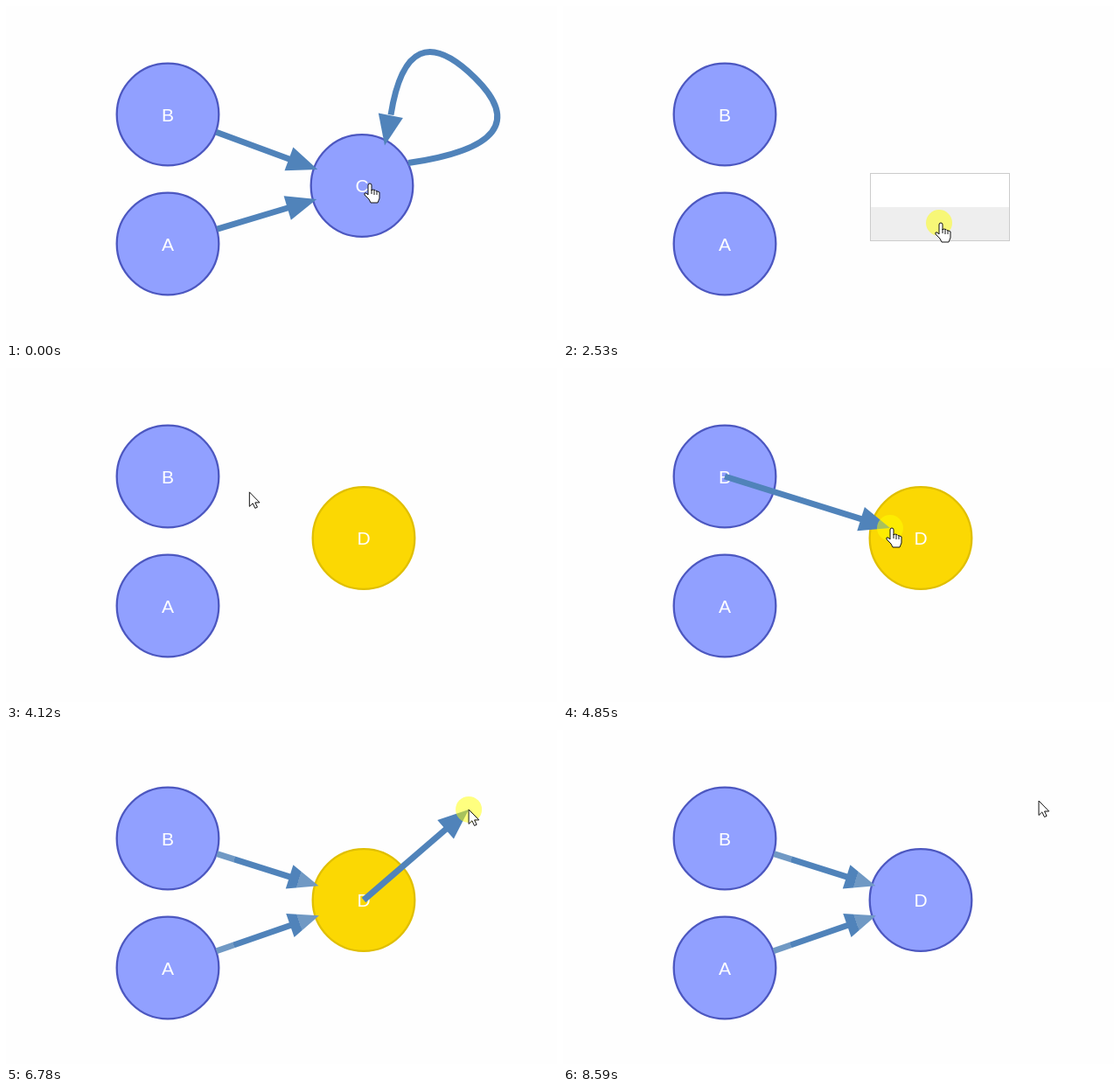
These frames come from a looping animation (630 by 382 pixels, 9 s). An HTML page with a canvas:

```html
<!DOCTYPE html>
<html lang="en">
<head>
<meta charset="utf-8">
<title>Graph editor</title>
<style>
html, body { margin: 0; width: 100%; height: 100%; overflow: hidden; background: #fefefe; }
canvas { display: block; }
</style>
</head>
<body>
<canvas id="stage" width="630" height="382"></canvas>
<script>
const ctx = document.getElementById('stage').getContext('2d');
const LOOP = 9000, R = 58.3;
const BLUE = '#5083ba', LIGHT = '#7099c4', GOLD = '#fbd803';
const RED = 'rgba(255,0,0,.47)', YELLOW = 'rgba(255,255,0,.5)';
const A = { x: 185, y: 272, name: 'A' };
const B = { x: 185, y: 124, name: 'B' };
const C = { x: 407, y: 205.5, name: 'C' };
const GRAB = { x: 27, y: 21.5 };   // from the pointer to the centre of D

// pointer: time, x, y
const path = [
  [0, 414, 203], [2010, 414, 203], [2270, 430, 248], [3020, 430, 248],
  [3150, 456, 285.5], [3290, 443, 267], [3620, 382, 173], [3990, 382, 173],
  [4120, 279, 142], [4260, 187, 125], [4320, 187, 125], [4850, 374, 183],
  [5220, 374, 183], [5480, 190, 271], [5540, 190, 271], [5820, 370, 227],
  [6080, 385, 222], [6580, 385, 222], [6780, 529, 91], [6920, 540, 82],
  [7060, 540, 82], [7440, 444, 163], [7580, 444, 163], [8000, 544, 81], [9000, 544, 81]
];
// pressed button: from, to, colour
const presses = [
  [530, 600, RED], [960, 1030, YELLOW], [1440, 1570, RED], [2530, 2590, YELLOW],
  [3150, 3620, YELLOW], [4320, 4910, YELLOW], [5540, 6390, YELLOW],
  [6580, 7510, YELLOW], [8090, 8160, YELLOW]
];
const hand = new Path2D('M0 2a2 2 0 0 1 4 0v6l1-1 3 .5 1 1 2 .5 2 1v7l-2 5h-8l-2-4-5-5q-1-3 2-2l2 2z');
const fingers = new Path2D('M4 7v5M7 8v5M10 9v4');
const arrow = new Path2D('M0 0v16.5l3.8-3.6 2.7 5.6 2.6-1.2-2.6-5.3h5.2z');

const within = (t, from, to) => t >= from && t < to;
const distance = (p, q) => Math.hypot(p.x - q.x, p.y - q.y);

function pointerAt(t) {
  const i = path.findIndex(k => k[0] > t);
  const [t0, x0, y0] = path[i - 1], [t1, x1, y1] = path[i];
  const f = (t - t0) / (t1 - t0);
  return { x: x0 + (x1 - x0) * f, y: y0 + (y1 - y0) * f };
}

function disc(x, y, r, fill) {
  ctx.beginPath();
  ctx.arc(x, y, r, 0, 7);
  ctx.fillStyle = fill;
  ctx.fill();
}

function drawNode(n, selected) {
  disc(n.x, n.y, R, selected ? GOLD : '#91a0ff');
  ctx.strokeStyle = selected ? '#e0bf00' : '#4c57c0';
  ctx.lineWidth = 2.3;
  ctx.stroke();
  ctx.fillStyle = '#fff';
  ctx.font = '21px "Liberation Sans", Arial, sans-serif';
  ctx.textAlign = 'center';
  ctx.fillText(n.name, n.x, n.y + 7.5);
}

function drawHead(x, y, angle, colour) {
  ctx.save();
  ctx.translate(x, y);
  ctx.rotate(angle);
  ctx.beginPath();
  ctx.moveTo(0, 0);
  ctx.lineTo(-35, -14.3);
  ctx.lineTo(-35, 14.3);
  ctx.restore();
  ctx.fillStyle = colour;
  ctx.fill();
}

// Straight arrow between two distances along the line from p to q
function drawArrow(p, q, start, end, colour = BLUE) {
  const angle = Math.atan2(q.y - p.y, q.x - p.x);
  const at = d => [p.x + Math.cos(angle) * d, p.y + Math.sin(angle) * d];
  if (end - 34 > start) {
    ctx.beginPath();
    ctx.moveTo(...at(start));
    ctx.lineTo(...at(end - 34));
    ctx.strokeStyle = colour;
    ctx.lineWidth = 7;
    ctx.stroke();
  }
  drawHead(...at(end), angle, colour);
}

function drawEdge(p, q, shaded) {
  const d = distance(p, q);
  let colour = BLUE;
  if (shaded) {
    colour = ctx.createLinearGradient(p.x, p.y, q.x, q.y);
    const a = 80 / d, b = 1 - 78 / d;
    [[0, LIGHT], [a, LIGHT], [a, BLUE], [b, BLUE], [b, LIGHT], [1, LIGHT]]
      .forEach(stop => colour.addColorStop(...stop));
  }
  drawArrow(p, q, 59, d - 54, colour);
}

function drawSelfLoop(n, colour) {
  ctx.save();
  ctx.translate(n.x, n.y);
  ctx.beginPath();
  ctx.moveTo(53, -26);
  ctx.quadraticCurveTo(206, -48, 129, -123.5);
  ctx.quadraticCurveTo(52, -199, 33, -81);
  ctx.strokeStyle = colour;
  ctx.lineWidth = 7;
  ctx.stroke();
  drawHead(26, -46, Math.atan2(35, -7), colour);
  ctx.restore();
}

function drawMenu(rows, active) {
  ctx.fillStyle = '#fff';
  ctx.fillRect(351, 191, 160, rows * 39);
  ctx.fillStyle = '#eee';
  ctx.fillRect(351, 191 + active * 39, 160, 39);
  ctx.strokeStyle = '#ccc';
  ctx.lineWidth = 1;
  ctx.strokeRect(351.5, 191.5, 159, rows * 39 - 1);
}

function drawPointer(p, isHand) {
  ctx.save();
  ctx.translate(p.x, p.y);
  ctx.fillStyle = '#fff';
  ctx.strokeStyle = '#111';
  ctx.lineWidth = 1;
  const shape = isHand ? hand : arrow;
  ctx.fill(shape);
  ctx.stroke(shape);
  if (isHand) ctx.stroke(fingers);
  ctx.restore();
}

function draw(t) {
  const pointer = pointerAt(t);
  const held = pointerAt(Math.min(Math.max(t, 3150), 3620));
  const D = { x: held.x + GRAB.x, y: held.y + GRAB.y, name: 'D' };
  const nodes = [A, B];
  if (t < 1030) nodes.push(C);
  if (t >= 2590) nodes.push(D);

  ctx.fillStyle = '#fefefe';
  ctx.fillRect(0, 0, 630, 382);
  nodes.forEach(n => drawNode(n, n === D && within(t, 3150, 8160)));

  if (t < 1030) {
    drawEdge(B, C);
    drawEdge(A, C);
    drawSelfLoop(C, BLUE);
  }
  if (t >= 4910) drawEdge(B, D, true);
  if (t >= 6390) drawEdge(A, D, true);
  if (within(t, 7400, 8530)) drawSelfLoop(D, t < 8160 ? BLUE : GOLD);

  // Edge being pulled out of a node
  const from = within(t, 4320, 4910) ? B : within(t, 5540, 6390) ? A : within(t, 6580, 7400) ? D : null;
  if (from && distance(from, pointer) > 36) drawArrow(from, pointer, 0, distance(from, pointer));

  const menu = within(t, 600, 1030) ? 1 : within(t, 1570, 2590) ? 2 : 0;
  if (menu) drawMenu(menu, pointer.y > 230 ? 1 : 0);

  const press = presses.find(p => within(t, p[0], p[1]));
  if (press) disc(pointer.x, pointer.y, 15, press[2]);
  const hover = menu || within(t, 7960, 8590) || nodes.some(n => distance(n, pointer) < R);
  drawPointer(pointer, hover);
}

function frame() {
  draw(performance.now() % LOOP);
  requestAnimationFrame(frame);
}
frame();
</script>
</body>
</html>
```
